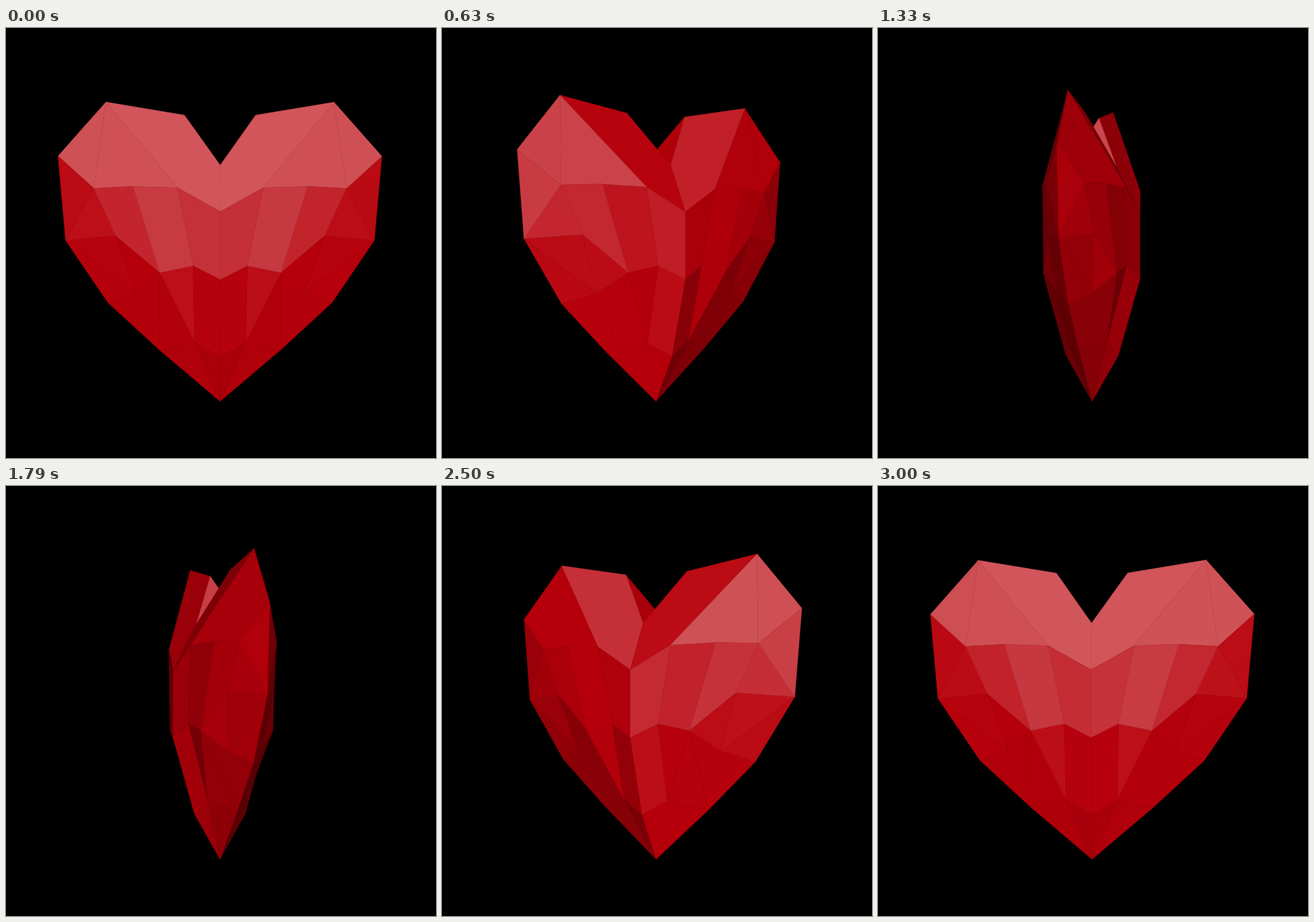
Write an HTML page with a canvas that moves like this. It is 628 px wide and 628 px high and loops after 3.04 s.

```html
<!DOCTYPE html>
<html lang="en">
<head>
<meta charset="utf-8">
<title>Faceted heart</title>
<style>
html, body { margin: 0; width: 100%; height: 100%; overflow: hidden; background: #000; }
canvas { display: block; }
</style>
</head>
<body>
<canvas id="stage" width="628" height="628"></canvas>
<script>
const ctx = document.getElementById('stage').getContext('2d');
const LOOP = 3040, STEP = 1000 / 24;
const AXIS = 312.6, EYE_Y = 353.2, DIST = 2450;
const LIGHT = [0, -0.32, 0.947];

// One quarter of the heart: screen x offset, screen y, depth (seen head-on)
const points = {
  W: [-236.5, 187, 0], T: [-166.5, 108, 0], U: [-52, 127, 0], N: [0, 200, 36],
  A: [-184.5, 234, 27], J: [-127.5, 231, 45], K: [-62.5, 233, 61], P: [0, 268, 71],
  E: [-225.5, 310, 0], M: [-152.5, 303, 33], S: [-88.5, 357, 53], V: [-39.5, 347, 58],
  Q: [0, 367, 71], L: [-122.5, 386, 24], G: [-163.5, 401, 0], H: [-88.5, 470, 0],
  D: [-37, 459, 29], R: [0, 480, 39], B: [0, 545, 0]
};
for (const k in points) {
  const [x, y, z] = points[k], f = 1 - z / DIST;
  points[k] = [x * f, (y - 353) * f, z];
}
points.n = [points.N[0], points.N[1], -points.N[2]];

const quarter = 'WAT TAJK TUNPK WAE AEM AJSM JKVS KPQV EML ELG MSL GLSH SDH SVD QVDR RDB DHB'.split(' ');

// Light level -> colour
const ramp = [
  [0, 88, 0, 5], [0.2, 112, 0, 6], [0.4, 140, 0, 8], [0.5, 160, 0, 9], [0.6, 171, 0, 10],
  [0.7, 181, 0, 11], [0.78, 183, 3, 13], [0.83, 188, 13, 22], [0.885, 195, 38, 46],
  [0.92, 199, 56, 64], [0.96, 206, 80, 85], [1, 212, 90, 95]
];

const dot = (a, b) => a[0] * b[0] + a[1] * b[1] + a[2] * b[2];

function normalOf(pts) {
  const n = [0, 0, 0];
  pts.forEach((p, i) => {
    const q = pts[(i + 1) % pts.length];
    n[0] += (p[1] - q[1]) * (p[2] + q[2]);
    n[1] += (p[2] - q[2]) * (p[0] + q[0]);
    n[2] += (p[0] - q[0]) * (p[1] + q[1]);
  });
  const len = Math.hypot(...n);
  const out = Math.abs(n[2]) > len * 0.01 ? n[2] : n[0];
  return n.map(v => v / len * Math.sign(out));
}

const faces = [];
function addFace(names, sx, sz) {
  const pts = [...names].map(k => points[k]);
  const mirror = p => [p[0] * sx, p[1], p[2] * sz];
  faces.push({ pts: pts.map(mirror), normal: mirror(normalOf(pts)) });
}
for (const sx of [-1, 1]) {
  for (const sz of [-1, 1]) quarter.forEach(f => addFace(f, sx, sz));
  addFace('UNn', sx, 1);
}

function shade(level) {
  const t = Math.min(1, Math.max(0, level));
  let i = 1;
  while (i < ramp.length - 1 && ramp[i][0] < t) i++;
  const a = ramp[i - 1], b = ramp[i], f = (t - a[0]) / (b[0] - a[0]);
  const mix = k => Math.round(a[k] + (b[k] - a[k]) * f);
  return `rgb(${mix(1)},${mix(2)},${mix(3)})`;
}

function draw(ms) {
  const step = Math.min(72, Math.floor((ms + 5) / STEP));
  const angle = Math.max(0.4, 2.507 * step - 1.6) * Math.PI / 180;
  const c = Math.cos(angle), s = Math.sin(angle);
  const turn = ([x, y, z]) => [x * c + z * s, y, z * c - x * s];

  const visible = [];
  for (const face of faces) {
    const pts = face.pts.map(turn), n = turn(face.normal), p = pts[0];
    if (dot(n, [-p[0], -p[1], DIST - p[2]]) <= 0) continue;
    const depth = pts.reduce((sum, q) => sum + q[2], 0) / pts.length;
    visible.push({ pts, depth, color: shade(dot(n, LIGHT)) });
  }
  visible.sort((a, b) => a.depth - b.depth);

  ctx.fillStyle = '#000';
  ctx.fillRect(0, 0, 628, 628);
  ctx.lineWidth = 0.4;
  ctx.lineJoin = 'round';
  for (const { pts, color } of visible) {
    ctx.beginPath();
    for (const [x, y, z] of pts) {
      const f = DIST / (DIST - z);
      ctx.lineTo(AXIS + x * f, EYE_Y + y * f);
    }
    ctx.closePath();
    ctx.fillStyle = ctx.strokeStyle = color;
    ctx.fill();
    ctx.stroke();
  }
}

const start = performance.now();
function tick() {
  draw((performance.now() - start) % LOOP);
  requestAnimationFrame(tick);
}
tick();
</script>
</body>
</html>
```
